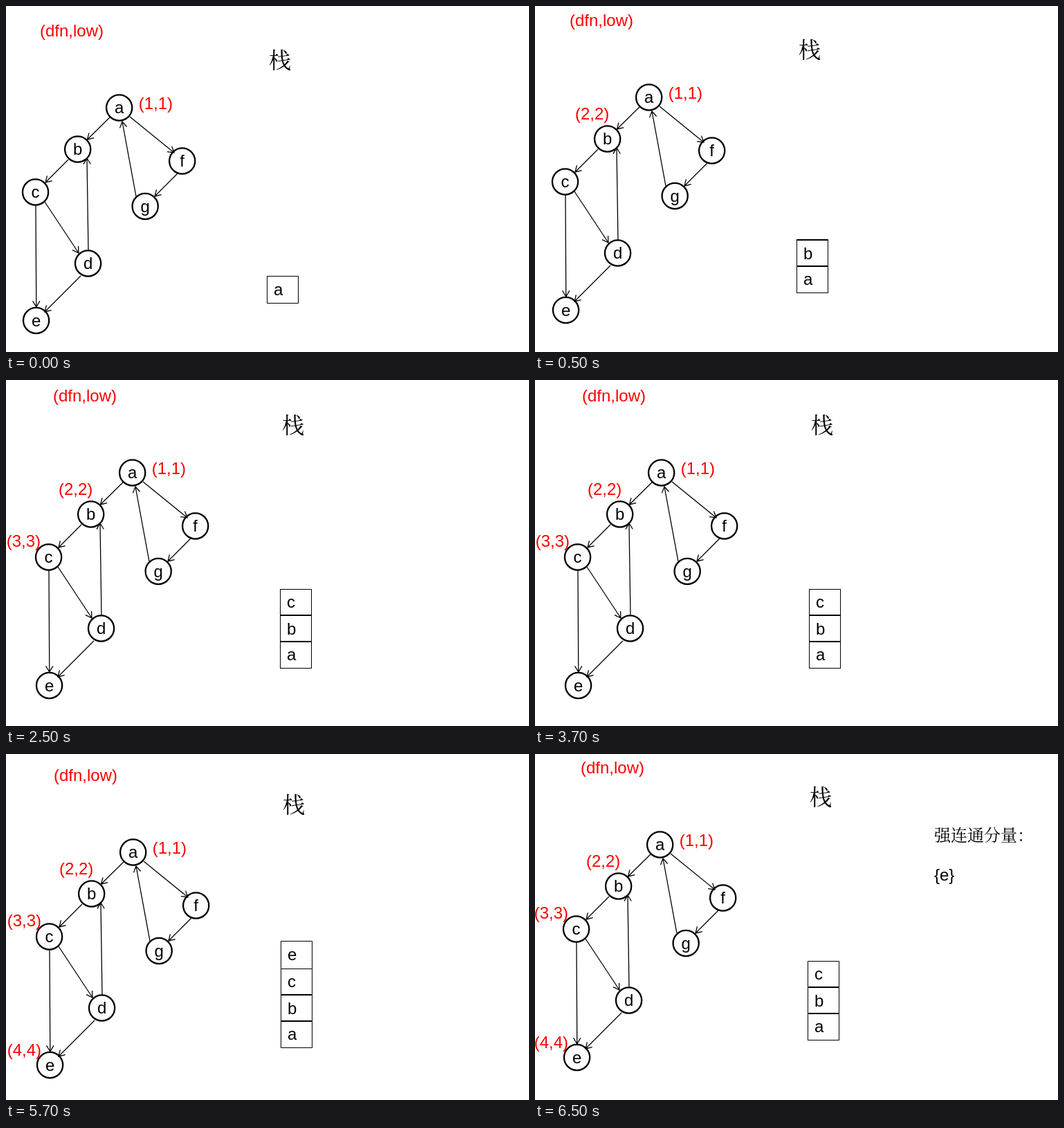
These frames come from a looping animation (756 by 500 pixels, 8000 ms). An HTML page:

```html
<!DOCTYPE html>
<html lang="zh-CN">
<head>
<meta charset="utf-8">
<title>DFS stack</title>
<style>
html, body { margin: 0; width: 100%; height: 100%; overflow: hidden; background: #fff; }
svg { display: block; width: 756px; height: 500px; }
text { font: 24px "Liberation Sans", Arial, sans-serif; }
.red { fill: #f00; }
.mid { text-anchor: middle; }
.han { font-family: "Noto Serif CJK SC", "Noto Sans CJK SC", "Noto Sans CJK", serif; font-weight: 300; }
.big { font-size: 32px; }
circle, path, rect { fill: none; stroke: #000; }
circle { stroke-width: 2.3; }
path { stroke-width: 1.3; }
rect { stroke-width: 1; }
</style>
</head>
<body>
<svg viewBox="0 0 756 500"><g id="scene"></g></svg>
<script>
const scene = document.getElementById('scene');
const LOOP = 8000;

const nodes = {
  a: [163.7, 147], b: [103.7, 207], c: [42.6, 269], d: [118.6, 372],
  e: [43.6, 454.5], f: [254.7, 224], g: [201.2, 289.5]
};

const edges = [
  [151, 160, 117.5, 193], [179, 160, 243, 212], [90, 222, 57, 255],
  [43, 288, 43.8, 435], [56, 283, 105, 357], [119, 353, 117, 220],
  [108, 390, 56, 442], [248, 242, 215, 275], [188, 275, 168, 167]
];

// visit label: x, baseline
const labels = [[191.7, 149.3], [57, 179.3], [-18.3, 254.3], [-18.3, 441.3]];

// stack cell: letter, top, bottom, baseline
const cells = [
  ['a', 390.5, 429.5, 418], ['b', 352.5, 391.5, 380.5],
  ['c', 315.5, 353.5, 342], ['e', 275.5, 315.5, 303]
];

// start time, shift x, shift y, labels shown, stack height, component found
const steps = [
  [0, 0, 0, 1, 1, false],
  [500, 1, -15, 2, 2, false],
  [2500, 19, -13, 3, 3, false],
  [4500, 20, -5, 4, 4, false],
  [6500, 17, -16, 4, 3, true]
];

function add(parent, tag, attrs, content) {
  const el = document.createElementNS('http://www.w3.org/2000/svg', tag);
  for (const k in attrs) el.setAttribute(k, attrs[k]);
  if (content) el.textContent = content;
  parent.appendChild(el);
  return el;
}

const write = (parent, x, y, str, cls = '') => add(parent, 'text', { x, y, class: cls }, str);

function arrow([x1, y1, x2, y2]) {
  const back = Math.atan2(y1 - y2, x1 - x2);
  const wing = s => `${x2 + 10 * Math.cos(back + s)} ${y2 + 10 * Math.sin(back + s)}`;
  add(scene, 'path', { d: `M${x1} ${y1}L${x2} ${y2}M${wing(0.54)}L${x2} ${y2}L${wing(-0.54)}` });
}

write(scene, 49, 44, '(dfn,low)', 'red');
write(scene, 380, 90, '栈', 'han big');
edges.forEach(arrow);
for (const [name, [cx, cy]] of Object.entries(nodes)) {
  add(scene, 'circle', { cx, cy, r: 18.6 });
  write(scene, cx, cy + 8, name, 'mid');
}

const labelEls = labels.map(([x, y], i) => write(scene, x, y, `(${i + 1},${i + 1})`, 'red'));

const cellEls = cells.map(([name, top, bottom, base]) => {
  const g = add(scene, 'g', {});
  add(g, 'rect', { x: 377.5, y: top, width: 45, height: bottom - top });
  write(g, 387, base, name);
  return g;
});
// heavier top edge of cell b
add(cellEls[1], 'path', { d: 'M377 353.5H423', style: 'stroke-width:1' });

const found = add(scene, 'g', {});
write(found, 560, 142, '强连通分量:'.replace(':', '：'), 'han');
write(found, 560, 198.5, '{e}');

const show = (el, on) => el.setAttribute('visibility', on ? 'visible' : 'hidden');

let current = -1;
function draw() {
  const t = performance.now() % LOOP;
  const i = steps.filter(s => s[0] <= t).length - 1;
  if (i !== current) {
    current = i;
    const [, dx, dy, seen, height, done] = steps[i];
    scene.setAttribute('transform', `translate(${dx} ${dy})`);
    labelEls.forEach((el, n) => show(el, n < seen));
    cellEls.forEach((el, n) => show(el, n < height));
    show(found, done);
  }
  requestAnimationFrame(draw);
}
draw();
</script>
</body>
</html>
```
